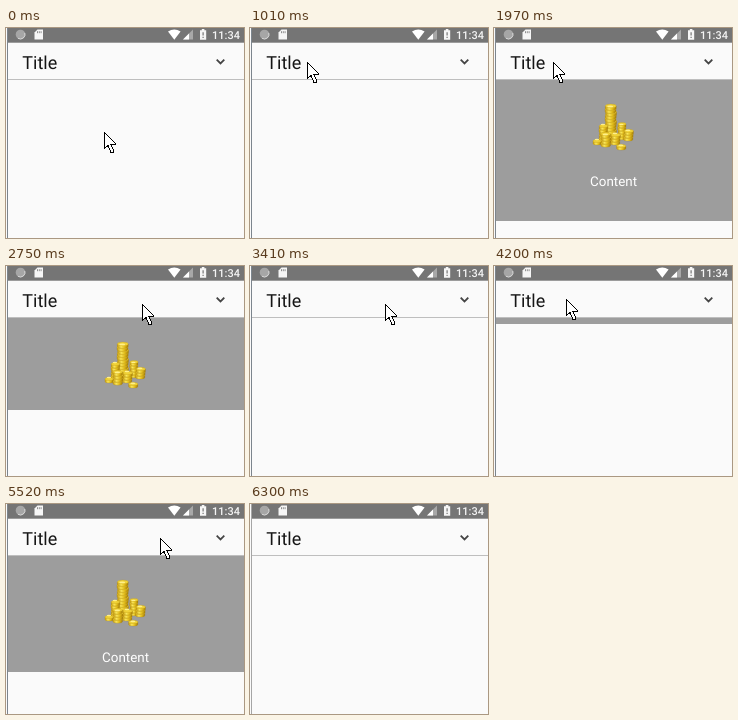
Write an HTML page that moves like this. It is 238 px wide and 210 px high and loops after 6400 ms.

```html
<!DOCTYPE html>
<html lang="en">
<head>
<meta charset="utf-8">
<title>Expanding panel</title>
<style>
  html, body { margin: 0; width: 100%; height: 100%; overflow: hidden; background: #fafafa; }
  #stage { position: relative; width: 238px; height: 210px; overflow: hidden; background: #fafafa; }
  #stage > * { position: absolute; }
  svg { display: block; }
  text { font-family: Roboto, sans-serif; text-rendering: geometricPrecision; }

  #edge { left: 1px; top: 0; width: 1px; height: 210px; animation: edge 6.4s step-end infinite; }
  #screen { left: 0; top: 0; }
  #panel {
    left: 2px; top: 52px; width: 236px; height: 0; overflow: hidden; background: #9d9d9d;
    animation: panel 6.4s cubic-bezier(.37, 0, .63, 1) infinite;
  }
  #cursor { left: 98px; top: 104px; animation: cursor 6.4s cubic-bezier(.37, 0, .63, 1) infinite; }

  @keyframes edge {
    0% { background: #7c858d; }
    98.437%, 100% { background: #a5a5a5; }
  }
  @keyframes panel {
    0%, 21.797% { height: 0; }
    27.266%, 40.781% { height: 141px; }
    46.25%, 64.922% { height: 0; }
    70.391%, 84.75% { height: 141px; }
    90.219%, 100% { height: 0; }
  }
  @keyframes cursor {
    0%, 2.344% { left: 98px; top: 104px; }
    12.813%, 13.438% { left: 58px; top: 35px; }
    15.781%, 30.156% { left: 57px; top: 34px; }
    36.25%, 52.813% { left: 136px; top: 38px; }
    59.844%, 74.688% { left: 72px; top: 33px; }
    82.5%, 90.469% { left: 154px; top: 34px; animation-timing-function: ease-in; }
    94.688% { left: 197px; top: 192px; animation-timing-function: linear; }
    96.563%, 100% { left: 201px; top: 212px; }
  }
</style>
</head>
<body>
<div id="stage">
  <svg id="screen" width="238" height="210">
    <rect x="2" width="236" height="14.7" fill="#757575"/>
    <circle cx="14.5" cy="6.5" r="4.8" fill="#a6a6a6"/>
    <path d="M18.8 5A4.6 4.6 0 0 1 12 10.3" fill="none" stroke="#d6d6d6"/>
    <path d="M31.5 1.5H37V11.5H28.5V4.5Z" fill="#f6f6f6"/>
    <path d="M31.5 3.2V5.2M33.3 3.2V5.2M35.1 3.2V5.2" stroke="#757575" stroke-width=".8"/>
    <path d="M162 3.6Q168.3 -.8 174.6 3.6L168.3 11.7Z" fill="#fff"/>
    <path d="M187 1.5V11.5H177Z" fill="#a8a8a8"/>
    <path d="M183 5.5V11.5H177Z" fill="#fff"/>
    <path d="M195.8 1H198.4V2.2H200.2V11.7H194V2.2H195.8Z" fill="#f6f6f6"/>
    <path d="M197.1 4.2V7.6M197.1 8.7V10" stroke="#757575" stroke-width="1.2"/>
    <text x="206" y="10.5" font-size="11" font-weight="500" fill="#f4f4f4">11:34</text>
    <text x="16.3" y="41" font-size="18" fill="#161616">Title</text>
    <path d="M210.7 31.7L214.5 35.5L218.3 31.7" fill="none" stroke="#444" stroke-width="1.8"/>
    <rect x="2" y="51" width="236" height="1" fill="#bebebe"/>
  </svg>
  <div id="edge"></div>
  <div id="panel">
    <svg width="236" height="141" viewBox="2 52 236 141">
      <defs>
        <linearGradient id="gold">
          <stop offset="0" stop-color="#c59a10"/>
          <stop offset=".35" stop-color="#fbe85c"/>
          <stop offset=".65" stop-color="#e6c01c"/>
          <stop offset="1" stop-color="#a27a08"/>
        </linearGradient>
      </defs>
      <g id="coins"></g>
      <text x="119.6" y="158.1" font-size="13.4" text-anchor="middle" fill="#fff">Content</text>
    </svg>
  </div>
  <svg id="cursor" width="13" height="22" shape-rendering="crispEdges">
    <path d="M.5 .5V16.5L4 13.5L7 20.5H9.5V18.5L7 12.5H11.5V11.5Z" fill="#fff" stroke="#000"/>
  </svg>
</div>
<script>
  const coins = document.getElementById('coins');

  function add(tag, attrs) {
    const el = document.createElementNS('http://www.w3.org/2000/svg', tag);
    for (const key in attrs) el.setAttribute(key, attrs[key]);
    coins.append(el);
  }

  // A pile of discs, drawn from the bottom coin up
  function stack(x, top, bottom, r) {
    const ry = r * .36;
    for (let y = bottom, i = 0; y >= top; y -= 3, i++) {
      const cx = x + (i % 3 - 1) * .3;
      add('path', {
        d: `M${cx - r} ${y}v2.4a${r} ${ry} 0 0 0 ${2 * r} 0v-2.4z`,
        fill: 'url(#gold)', stroke: '#a8830f', 'stroke-width': .3
      });
      add('ellipse', { cx, cy: y, rx: r, ry, fill: '#f0d238', stroke: '#b8920f', 'stroke-width': .3 });
    }
    add('ellipse', { cx: x - .6, cy: top + .4, rx: r * .55, ry: ry * .5, fill: '#fff08a' });
  }

  // Back row first
  [
    [116.8, 78, 108, 5.4],
    [128, 96, 108, 4],
    [109.5, 96, 110, 4.2],
    [134.5, 102, 109, 4.6],
    [103.5, 111, 113, 4.2],
    [121.5, 105, 113, 4.6],
    [112, 106, 115, 4.8],
    [127.5, 117, 118, 4.6]
  ].forEach(s => stack(...s));
</script>
</body>
</html>
```
